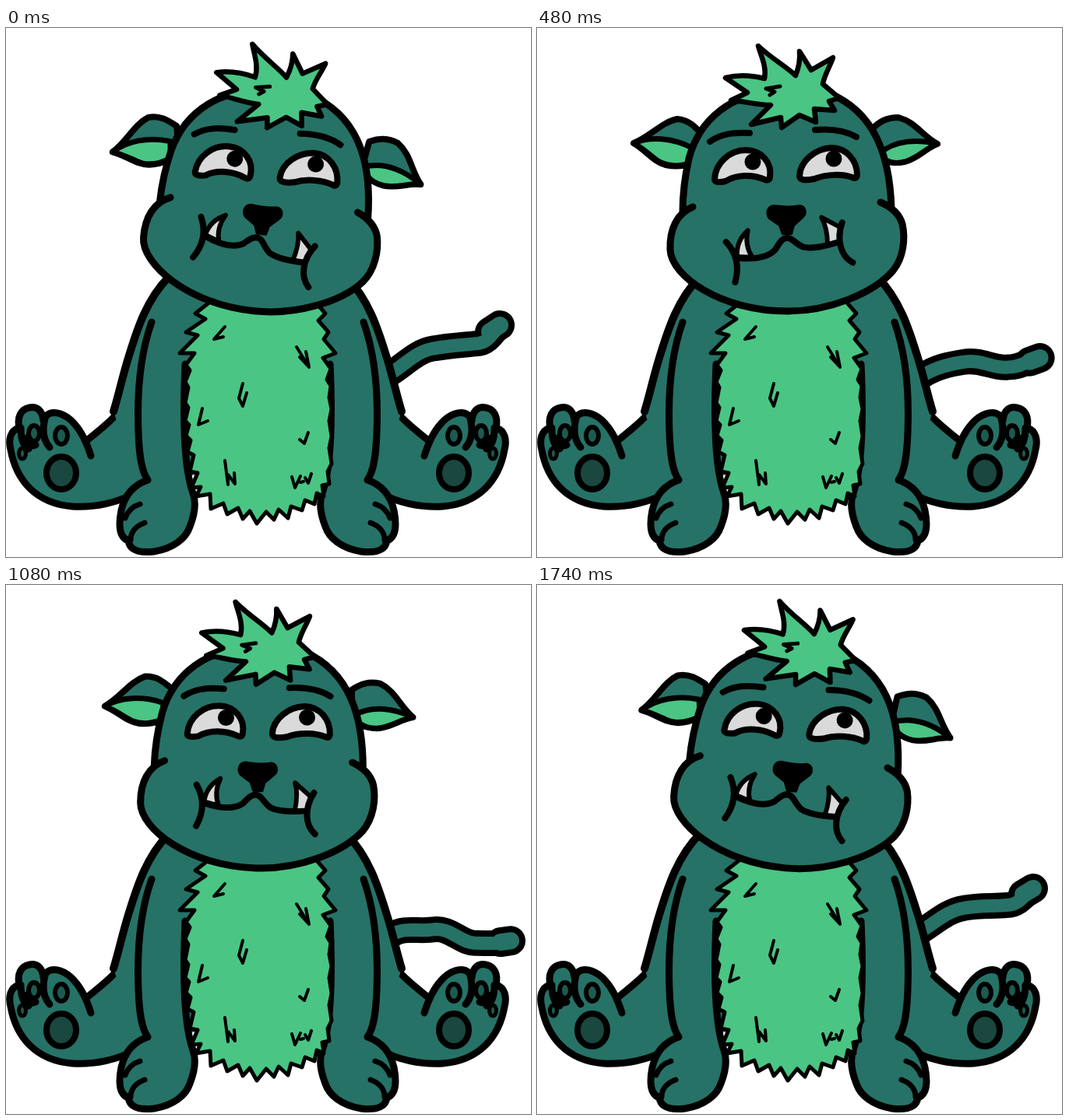
An HTML page with a canvas for the animation above (1.8 s loop, 674 px wide and 680 px high).

```html
<!DOCTYPE html>
<html lang="en">
<head>
<meta charset="utf-8">
<title>Green monster</title>
<style>
html, body { margin: 0; width: 100%; height: 100%; overflow: hidden; background: #fff; }
canvas { display: block; }
</style>
</head>
<body>
<canvas id="stage" width="674" height="680"></canvas>
<script>
const ctx = document.getElementById('stage').getContext('2d');
const SKIN = '#267266', FUR = '#4ac584', PAD = '#1a473f', TOE = '#1d5a50', BONE = '#dadada';
const LOOP = 1800, STEP = 60;
const P = d => new Path2D(d);

// Smooth periodic curve through [time, value] keys
function curve(keys, period) {
  const n = keys.length;
  const key = i => {
    const k = keys[(i + n) % n];
    return [k[0] + period * Math.floor(i / n), k[1]];
  };
  const slope = i => {
    const a = key(i - 1), b = key(i), c = key(i + 1);
    if ((b[1] - a[1]) * (c[1] - b[1]) <= 0) return 0;
    return (c[1] - a[1]) / (c[0] - a[0]);
  };
  return time => {
    const t = time % period;
    let i = n - 1;
    while (i > 0 && keys[i][0] > t) i--;
    const a = key(i), b = key(i + 1), h = b[0] - a[0], u = (t - a[0]) / h;
    const v = u * u * (3 - 2 * u);
    return a[1] + (b[1] - a[1]) * v
      + h * (slope(i) * u * (1 - u) * (1 - u) - slope(i + 1) * u * u * (1 - u));
  };
}

const sway = curve([[0, 0], [60, .3], [240, .82], [360, .97], [480, 1], [720, .39], [840, .15]], 900);
const chew = curve([[0, 14.5], [60, 11.3], [240, .4], [360, -5.6], [480, -9.5], [720, 4.1], [840, 11]], 900);
const wag = curve([[0, 382], [240, 441], [330, 444], [480, 424], [690, 376], [720, 377], [960, 453],
  [1100, 457], [1260, 449], [1620, 407], [1740, 390]], LOOP);

function droop(t) {
  if (t < 180) return 1 - t / 180;
  if (t < 480) return Math.max(0, 1 - Math.abs(t - 360) / 120);
  return (t - 480) / (LOOP - 480);
}

function draw(d, fill, width) {
  if (fill) { ctx.fillStyle = fill; ctx.fill(d); }
  if (width) { ctx.lineWidth = width; ctx.stroke(d); }
}

function turn(x, y, deg, paint) {
  ctx.save();
  ctx.translate(x, y);
  ctx.rotate(deg * Math.PI / 180);
  ctx.translate(-x, -y);
  paint();
  ctx.restore();
}

function bothSides(paint) {
  paint();
  ctx.save();
  ctx.translate(646, 0);
  ctx.scale(-1, 1);
  paint();
  ctx.restore();
}

function oval(x, y, rx, ry, fill, width) {
  const d = new Path2D();
  d.ellipse(x, y, rx, ry, 0, 0, 7);
  draw(d, fill, width);
}

const footLine = 'M109 550C104 534 98 520 88 509C78 497 62 490 52 498L48 505C47 491 39 486 30 488C19 490 14 500 17 514C5 517 3 530 6 542C13 581 38 611 85 615C115 617 145 609 160 600';
const leg = {
  fill: P(footLine + 'L185 580L160 478L104 531Z'),
  line: P(footLine + 'M159 478C142 499 124 514 104 530M50 502C46 518 48 530 56 539M19 514C19 528 22 537 29 541M38 536C32 539 28 534 27 527')
};
const sideLine = 'M209 320C179 350 167 392 157 424C149 450 145 470 138 493';
const side = { fill: P(sideLine + 'L160 560L185 585L320 560L320 320Z'), line: P(sideLine) };
const armLine = 'M187 378C172 420 168 470 170 520C171 550 174 570 182 581C162 588 152 602 148 620C144 640 146 655 157 659C159 672 171 675 190 673C215 669 231 656 236 641C242 626 245 612 240 598C230 570 226 520 230 432';
const arm = {
  fill: P(armLine + 'L262 350L215 318Z'),
  line: P(armLine),
  fingers: P('M172 612C162 615 156 622 153 630M178 636C167 640 160 648 160 658')
};
const belly = P('M262 352L243 367L256 374L231 391L246 395L223 418L242 418L231 433L236 440L230 455L234 462L230 482L234 488L230 505L235 510L231 524L237 530L233 545L241 549L236 570L246 572L238 591L250 590L244 602L262 599L263 618L279 611L284 625L298 617L304 631L313 621L322 637L334 622L344 632L350 619L362 630L366 615L380 620L384 607L396 612L399 598L408 602L406 588L415 586L413 570L418 560L415 540L418 525L415 505L418 490L415 475L417 460L412 452L417 438L407 424L423 418L408 400L414 391L401 376L410 367L397 352Z');
const marks = P('M281 384L267 400L279 397M373 410L389 436L385 416M377 423L389 436M304 457L299 476L304 486L309 469M252 489L247 510L259 505M388 520L383 534L377 529M281 556L285 587L285 574L294 586L293 572M367 577L371 591L378 576M378 584L382 583M392 573L388 585L384 578');

const cheeks = 'C180 238 170 258 171 285C172 318 235 364 322 364C375 364 432 341 457 312C471 295 473 270 469 252C465 238 455 230 441 224';
const brow = 'M310 82C250 82 208 118 195 168C190 190 187 215 187 237';
const temple = 'L455 232C453 165 434 108 375 84';
const head = {
  fill: P(brow + 'L200 230' + cheeks + temple + 'Z'),
  line: P(brow + 'M200 230' + cheeks + temple.replace('L', 'M'))
};
const hair = P('M249 93L270 83L242 64C258 60 276 61 292 65C295 50 288 37 284 23C302 40 318 48 332 61C336 51 338 41 337 30L352 54L380 38C376 50 369 60 367 72L388 90L375 94L382 106L356 104L358 121L337 112L314 128L313 115L275 124L300 99C282 99 266 94 249 93Z');
const tuft = P('M312 75L294 78L305 82L299 86');
const brows = P('M222 146C236 136 252 134 273 135M357 131C380 129 396 132 410 140');
const eyes = P('M228 194C229 174 247 157 268 157C288 157 302 173 299 192Q298 197 293 195C277 188 256 188 242 197Q228 200 228 194ZM337 190C338 171 357 155 378 154C397 154 411 170 411 189Q410 195 405 192C393 188 373 187 356 194Q337 198 337 190Z');
const nose = P('M304 228C319 230 329 230 337 228C346 229 347 239 341 244L330 254L327 265L315 265L311 254L298 245C293 239 295 229 304 228Z');
const lips = P('M243 262C255 280 254 298 246 315M255 285C278 291 294 290 304 282C312 272 316 269 321 270C327 270 331 280 340 285C353 290 371 288 385 286M394 262C383 282 385 304 399 315');
const tusks = P('M254 283C255 269 262 259 273 252C268 264 268 276 273 287ZM369 251C373 262 373 273 371 287L387 286L391 268Z');

const ears = [
  { x: 195, y: 150, dir: -1,
    skin: P('M124 148C145 140 160 121 180 117C195 118 203 127 212 137L207 167C195 179 180 179 165 176C148 171 140 157 124 148Z'),
    inner: P('M124 148C145 139 174 141 199 154L194 175C177 179 165 176 157 172C145 164 140 157 124 148Z') },
  { x: 445, y: 150, dir: 1,
    skin: P('M514 149C494 138 486 121 464 115C449 115 440 120 430 130L438 167C448 174 460 174 472 172C490 167 498 155 514 149Z'),
    inner: P('M514 149C490 143 460 143 439 162C447 173 460 175 472 172C490 167 498 155 514 149Z') }
];

function tail(y) {
  const x = 648 - 16 * ((453 - y) / 76) ** 2;
  const lift = y - 377, m1 = 410 + lift * .41, m2 = 402 + lift * .725;
  const base = 438 + lift * .09;
  const d = P(`M496 ${base + 4}C512 ${base - 6} 528 ${m1 + 3} 548 ${m1}C570 ${m1 - 4} 586 ${m2 + 2} 604 ${m2}C620 ${m2} 628 ${y + 5} ${x} ${y}`);
  const tip = P(`M${x - 13} ${y + 9 - lift * .09}L${x} ${y}`);
  const pass = (color, width, tipWidth) => {
    ctx.strokeStyle = color;
    draw(d, null, width);
    draw(tip, null, tipWidth);
  };
  pass('#000', 33, 38);
  pass(SKIN, 17, 22);
  ctx.strokeStyle = '#000';
}

function body() {
  bothSides(() => {
    draw(leg.fill, SKIN);
    draw(leg.line, null, 9);
    oval(71, 572, 19, 21, PAD, 8);
    oval(71, 524, 8, 11, TOE, 6);
    oval(36, 521, 7, 10, TOE, 6);
    oval(21, 547, 4.5, 7, TOE, 5);
  });
  bothSides(() => {
    draw(side.fill, SKIN);
    draw(side.line, null, 10);
  });
  bothSides(() => {
    draw(arm.fill, SKIN);
    draw(arm.line, null, 9);
    draw(arm.fingers, null, 7);
  });
  draw(belly, FUR, 5);
  draw(marks, null, 4);
}

function face(t) {
  const s = sway(t), low = droop(t);
  turn(322, 330, 6 * (1 - s), () => {
    for (const e of ears) {
      ctx.save();
      ctx.translate(e.dir * 8 * low, 6 * low);
      turn(e.x, e.y, e.dir * 21 * low, () => {
        draw(e.skin, SKIN, 8);
        draw(e.inner, FUR, 7);
      });
      ctx.restore();
    }
    draw(head.fill, SKIN);
    draw(head.line, null, 9);
    draw(hair, FUR, 6.5);
    draw(tuft, null, 5);
    draw(brows, null, 8);
    draw(eyes, BONE, 8);
    oval(277, 172, 10.5, 10.5, '#000');
    oval(381, 168, 10.5, 10.5, '#000');
    draw(nose, '#000', 2);
  });
  ctx.save();
  ctx.translate(3 * (1 - s), 0);
  turn(321, 270, chew(t), () => {
    draw(tusks, BONE, 6);
    draw(lips, null, 8);
  });
  ctx.restore();
}

function frame(now) {
  const t = Math.floor((now % LOOP) / STEP) * STEP;
  ctx.fillStyle = '#fff';
  ctx.fillRect(0, 0, 674, 680);
  ctx.strokeStyle = '#000';
  ctx.lineCap = ctx.lineJoin = 'round';
  tail(wag(t));
  body();
  face(t);
}

const start = performance.now();
function tick() {
  frame(performance.now() - start);
  requestAnimationFrame(tick);
}
tick();
</script>
</body>
</html>
```
